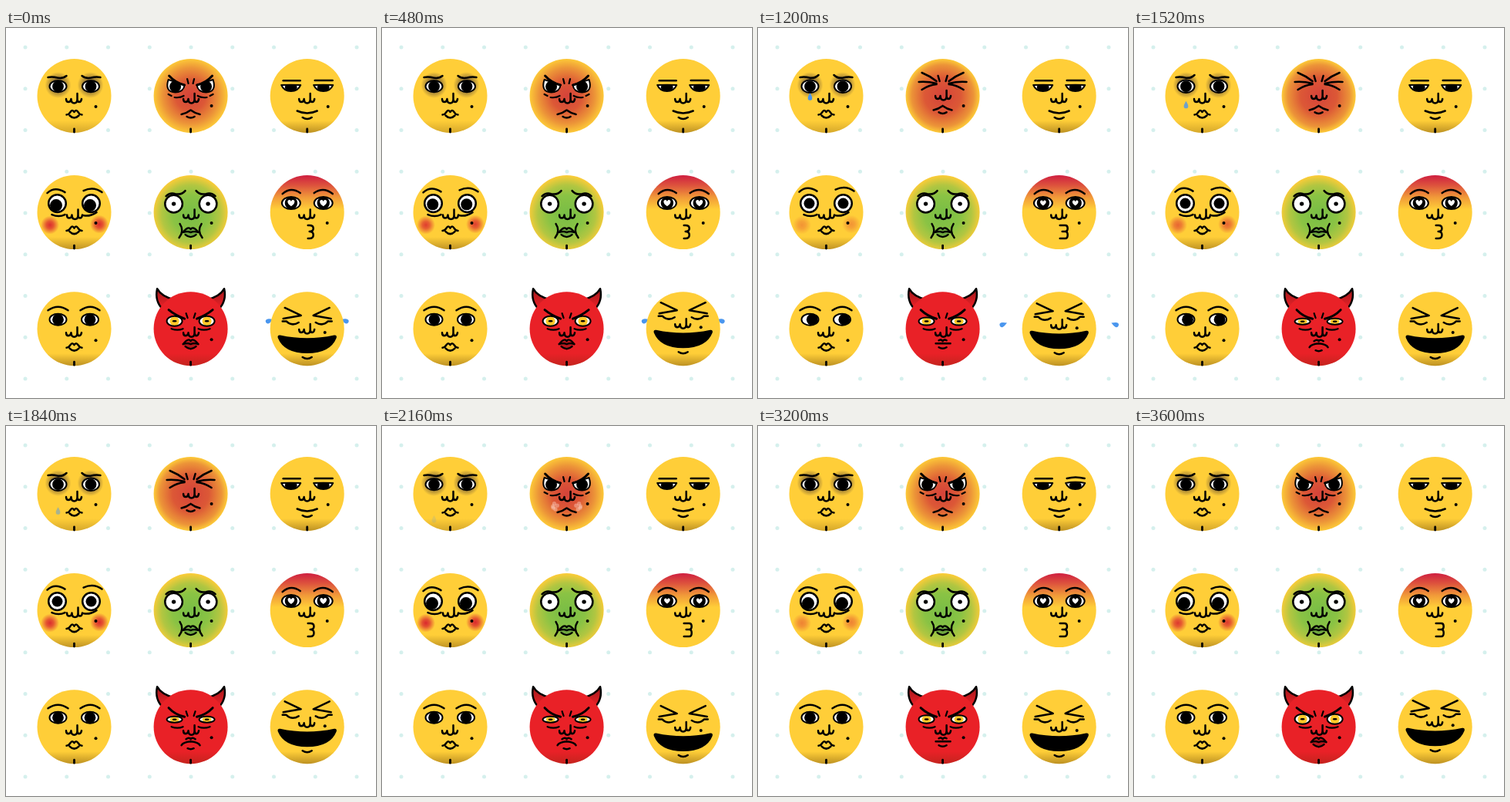
These frames come from a looping animation (480x480 px, 3.68 s). An HTML page with a canvas:

```html
<!DOCTYPE html>
<html lang="en">
<head>
<meta charset="utf-8">
<title>Nine faces</title>
<style>
html, body { margin: 0; width: 100%; height: 100%; overflow: hidden; background: #fff; }
canvas { display: block; width: 480px; height: 480px; }
</style>
</head>
<body>
<canvas id="stage"></canvas>
<script>
const LOOP = 3680, STEP = 80, R = 48, LINE = 2.5;
const YELLOW = '#ffce38', INK = '#000', BLUE = '#4a96ee';
const canvas = document.getElementById('stage');
const ctx = canvas.getContext('2d');
const dpr = window.devicePixelRatio || 1;
canvas.width = canvas.height = 480 * dpr;

const clamp = v => Math.max(0, Math.min(1, v));
const ramp = (t, a, b) => { const k = clamp((t - a) / (b - a)); return k * k * (3 - 2 * k); };
const pulse = (t, a, b, c, d) => ramp(t, a, b) - ramp(t, c, d);
const wave = (t, period, shift = 0) => .5 + .5 * Math.cos(2 * Math.PI * (t / period - shift));
const mix = (a, b, k) => a + (b - a) * k;

function stroke(d, width = LINE) {
  ctx.strokeStyle = INK;
  ctx.lineWidth = width;
  ctx.stroke(new Path2D(d));
}
function fill(d, color) {
  ctx.fillStyle = color;
  ctx.fill(new Path2D(d));
}
function oval(x, y, rx, ry, color, outline = 0) {
  ctx.beginPath();
  ctx.ellipse(x, y, rx, ry, 0, 0, 7);
  ctx.fillStyle = color;
  ctx.fill();
  if (outline) {
    ctx.strokeStyle = INK;
    ctx.lineWidth = outline;
    ctx.stroke();
  }
}
const dot = (x, y, r, color = INK, outline = 0) => oval(x, y, r, r, color, outline);

function at(x, y, draw, sx = 1, sy = sx) {
  ctx.save();
  ctx.translate(x, y);
  ctx.scale(sx, sy);
  draw();
  ctx.restore();
}
function mirrored(draw) {
  at(0, 0, draw);
  at(0, 0, draw, -1, 1);
}
// White shape with a black outline; whatever draw() paints stays inside it.
function socket(d, draw) {
  fill(d, '#fff');
  ctx.save();
  ctx.clip(new Path2D(d));
  draw();
  ctx.restore();
  stroke(d, 2);
}
function stops(gradient, list) {
  list.forEach(([p, c]) => gradient.addColorStop(p, c));
  return gradient;
}
const radial = (x, y, r, list) => stops(ctx.createRadialGradient(x, y, 0, x, y, r), list);
const vertical = (a, b, list) => stops(ctx.createLinearGradient(0, a, 0, b), list);
const glow = (x, y, r, rgb, a) => dot(x, y, r, radial(x, y, r,
  [[0, `rgba(${rgb},${a})`], [.4, `rgba(${rgb},${a * .75})`], [1, `rgba(${rgb},0)`]]));

// Head disc with optional shading along the jaw and a cleft in the chin.
function head(paint, shade, cleft) {
  dot(0, 0, R, paint);
  if (shade) dot(0, 0, R, vertical(32, 49, [[0, 'rgba(80,45,0,0)'], [1, `rgba(80,45,0,${shade})`]]));
  if (cleft) stroke('M0 43V47', 2.8);
}
const mole = (x = 28, y = 14) => dot(x, y, 2);
const nose = (x, y) => at(x, y, () =>
  stroke('M-9.5 -3Q-9.5 1 -6.5 1Q-3.5 1 -3 -3Q-3 2.5 1 2.5Q5 2.5 5 -3V-10M5 -3Q5 1 7.5 1Q10 1 10.5 -3'));
const lips = y => at(0, y, () =>
  stroke('M-10 1Q-7 1 -5 -2.5Q-2.5 -6.5 0 -2.5Q2.5 -6.5 5 -2.5Q7 1 10 1M-6 2Q0 8 6 2'));
const fullLips = (y, color) => at(0, y, () => {
  fill('M-10 0Q-3 -9 0 -4Q3 -9 10 0Q0 14 -10 0Z', color);
  stroke('M-10 0Q-3 -9 0 -4Q3 -9 10 0M-10 0Q-4 -2 0 0Q4 -2 10 0M-7 3Q0 9 7 3', 2.3);
});
const ellipse = (x, y, rx, ry) =>
  `M${x - rx} ${y}A${rx} ${ry} 0 0 1 ${x + rx} ${y}A${rx} ${ry} 0 0 1 ${x - rx} ${y}Z`;
const eye = (x, y, rx, ry, px, pr) => socket(ellipse(x, y, rx, ry), () => dot(x + px, y, pr));
const drop = (color, size) => at(0, 0, () => fill('M0 -5Q3 0 3 2A3 3 0 0 1 -3 2Q-3 0 0 -5Z', color), size);

function sad(t) {
  head(YELLOW, .25, true);
  const wide = pulse(t, 640, 960, 1920, 2160);
  mirrored(() => {
    glow(21, -14, 17, '60,45,50', .85);
    stroke(`M10 ${mix(-26, -27, wide)}Q15 -22 22 -23.5Q28 -25 34 -24`);
  });
  for (const side of [-21, 21.5]) eye(side, -12.3, 11, mix(7.5, 8.2, wide), 0, 7.4);
  nose(-1, 7);
  lips(23.5);
  mole();
  if (t > 960 && t < 2400) {
    ctx.globalAlpha = clamp((2320 - t) / 1000) * ramp(t, 960, 1120);
    at(-21, 1 + (t - 1200) * .033, () => drop(BLUE, .95));
    ctx.globalAlpha = 1;
  }
}

function angry(t) {
  const shut = pulse(t, 640, 960, 1920, 2120);
  head(radial(0, 0, 49, [[0, '#d5433a'], [mix(.4, .48, shut), '#dc5836'],
    [mix(.74, .82, shut), '#ec9438'], [.96, '#fbc438'], [1, YELLOW]]), 0, true);
  const up = -4 * shut;
  if (shut > .5) {
    mirrored(() => {
      stroke('M27 -30Q17 -26 8 -19M31 -18Q20 -19 8 -16M27 -8Q18 -14 8 -15M6 -26L4 -19');
    });
  } else {
    mirrored(() => {
      socket('M8 -14L29 -21Q34 -5 20 -4.5Q9 -5 8 -14Z', () => dot(20, -12, 7.5));
      stroke('M28 -26Q20 -17 8 -14', 3);
      stroke('M4.5 -22L3 -16M9 0Q14 3 21 2M25 0L29 -2', 2.2);
    });
  }
  nose(0, 7 + up);
  at(0, up * 1.4, () => stroke('M-12 24Q-6 23 0 18.5Q6 23 12 24M-5 27Q0 30 5 27'));
  mole(27, 13);
  const steam = (t - 2040) / 600;
  if (steam > 0 && steam < 1) {
    ctx.globalAlpha = .5 * (1 - steam);
    mirrored(() => at(14 + steam * 5, 15 + steam * 6, () => {
      for (let i = 0; i < 5; i++) dot(3 * Math.cos(i * 1.7), 4 * Math.sin(i * 1.7), 2.8, '#ffd9d0');
    }, .8 + steam * .7));
    ctx.globalAlpha = 1;
  }
}

function halfLid(x, open) {
  const lid = mix(-14.5, -23, open);
  socket(`M${x - 12.5} -14Q${x} ${lid} ${x + 12.5} -14Q${x + 9} -6 ${x} -6Q${x - 9} -6 ${x - 12.5} -14Z`,
    () => oval(x, -11, 8, 5 + open, INK));
}
function smirk(t) {
  head(YELLOW, .4, true);
  const wink = pulse(t, 2400, 2640, 3040, 3280);
  stroke('M-31 -19.8H-9');
  if (wink > .5) stroke('M-33 -11H-10');
  else halfLid(-21, 0);
  stroke(`M10 -20Q21 ${mix(-20, -32, wink)} 33 -20`);
  halfLid(21, wink);
  nose(-1, 7);
  stroke('M-13 19.5Q0 25.5 13 19.5M-6 28Q0 32 6 28');
  mole(27, 14);
}

function shy(t) {
  head(YELLOW, .38, true);
  const stare = pulse(t, 320, 640, 1880, 2120);
  const blush = .3 + .65 * wave(t, LOOP / 2, .1);
  glow(-31.5, 16.5, 12, '215,25,45', blush);
  glow(32.5, 15.5, 12, '215,25,45', blush);
  for (const side of [-22, 22]) {
    dot(side, -11.5, 11.3, '#fff', LINE);
    dot(side + mix(-1.5, 0, stare), mix(-9, -11.5, stare), mix(8, 7, stare));
  }
  at(0, -1.5 * stare, () => stroke('M-35 -25Q-25 -34 -12 -26M12 -28Q25 -34 36 -26'));
  stroke('M-29 3Q-20 7 -12 3M12 4Q20 6 29 0');
  nose(0, 6.5);
  lips(23);
  mole();
}

function sick() {
  head(radial(0, 2, 50, [[0, '#78bd46'], [.48, '#8ac344'], [.75, '#b2c641'], [1, '#fdcc38']]), 0, true);
  for (const side of [-22, 22.5]) {
    dot(side, -11, 11.3, '#fff', LINE);
    dot(side, -11, 2.7);
  }
  mirrored(() => {
    stroke('M7 -28Q12 -22 20 -24Q27 -26 32 -21');
    stroke('M14 15Q8 24 15 33');
  });
  nose(0, 6.5);
  fullLips(26, '#6ea63f');
  mole(27, 14);
}

function smitten(t) {
  head(vertical(-48, -4, [[0, '#cf1f40'], [.3, '#dd533d'], [.65, '#f19a39'], [1, YELLOW]]));
  const beat = wave(t, 480);
  for (const side of [-20.8, 21]) {
    eye(side, -12, 12, 8, 0, 8.2);
    at(side, -12, () => fill('M0 5C-8 0 -6 -6 -2 -5Q0 -4 0 -2Q0 -4 2 -5C6 -6 8 0 0 5Z', '#fff'), mix(.7, .82, beat));
  }
  stroke('M-32 -24Q-21 -33.5 -9 -25M9 -25Q21 -33.5 33 -24');
  nose(-1, 6.5);
  const w = mix(11, 8, beat), flat = mix(8, 3, beat);
  stroke(`M1 17H${flat}Q${w} 17 ${w} 21Q${w} 25 ${flat} 25H4H${flat}Q${w} 25 ${w} 29.5Q${w} 34 ${flat} 34H1`);
  mole(26, 14);
}

function calm(t) {
  head(YELLOW, .4, true);
  const glance = pulse(t, 320, 1040, 1360, 1840);
  for (const side of [-21, 20.5]) eye(side, -12, 11, 7.5, mix(0, 2.8, glance), 7.4);
  stroke('M-34 -24Q-21 -33 -8 -24M8 -24Q21 -33 33 -24');
  nose(-1, 8);
  lips(23.5);
  mole(28, 15);
}

function devil(t) {
  mirrored(() => {
    const horn = 'M43.5 -52Q38 -42 22 -38L36 -25Q47 -36 43.5 -52Z';
    fill(horn, vertical(-52, -28, [[0, '#a0181c'], [1, '#e92127']]));
    stroke(horn);
  });
  head('#e92127', .25, true);
  const scowl = pulse(t, 880, 1440, 2960, 3440);
  mirrored(() => {
    const ry = mix(6.5, 4, scowl), y = mix(-10, -9.5, scowl);
    socket(ellipse(21, y, 10, ry), () => {
      oval(21, y, 6, ry - .5, '#ffc928');
      oval(21, y, 3, 1.2, INK);
    });
    stroke(`M28.5 -24.5Q20 ${mix(-17.5, -15.5, scowl)} 8 -13`, 3);
    stroke('M6 -20L4 -14M10 0Q17 3 25 0', 2.2);
  });
  nose(0, 8);
  if (scowl < .35) {
    fullLips(20, '#b5161c');
  } else if (scowl < .8) {
    stroke('M-9 19H10M-5 15Q-2 13 0 16Q2 13 5 15M-5 24Q0 27 5 24');
  } else {
    stroke('M-12 24Q-10 20 0 19Q10 20 12 24M-6 16Q-2 13 0 16Q2 13 6 16M-4 28Q0 30 4 28');
  }
  mole(27, 14);
}

function laughing(t) {
  const phase = (t % 576) / 576;
  const flight = phase < .18 ? 28 * clamp(phase / .1) : 0;
  if (phase < .18 || phase > .8) {
    ctx.globalAlpha = phase > .8 ? 1 : clamp((.18 - phase) / .06);
    mirrored(() => at(49 + flight, -10.5 + flight * .2, () => {
      ctx.rotate(-1.2);
      drop(BLUE, 1);
    }));
    ctx.globalAlpha = 1;
  }
  head(YELLOW, .4);
  const low = ramp(wave(t, 640, .19), .15, .75);
  at(0, mix(-7, 0, low), () => {
    mirrored(() => stroke('M29 -27L8 -17L31 -13M32 -9.5H27Q20 -2.5 11 -8'));
    nose(-1, 4);
    fill('M-35 8.5Q0 16 35 8.5Q39 8 38 12Q30 32 0 32Q-30 32 -38 12Q-39 8 -35 8.5Z', INK);
    stroke('M-6 37Q0 41 6 37');
    mole(23, 5);
  });
}

const faces = [sad, angry, smirk, shy, sick, smitten, calm, devil, laughing];

function render(t) {
  ctx.setTransform(dpr, 0, 0, dpr, 0, 0);
  ctx.lineCap = ctx.lineJoin = 'round';
  ctx.fillStyle = '#fff';
  ctx.fillRect(0, 0, 480, 480);
  for (let i = 0; i < 81; i++) dot(25 + (i % 9) * 53.75, 25 + Math.floor(i / 9) * 53.75, 2.5, '#d5f0ed');
  faces.forEach((face, i) =>
    at(88.5 + (i % 3) * 151.1, 88 + Math.floor(i / 3) * 151.1, () => face(t)));
}

const start = performance.now();
function tick() {
  const t = (performance.now() - start) % LOOP;
  render(Math.floor(t / STEP) * STEP);
  requestAnimationFrame(tick);
}
tick();
</script>
</body>
</html>
```
